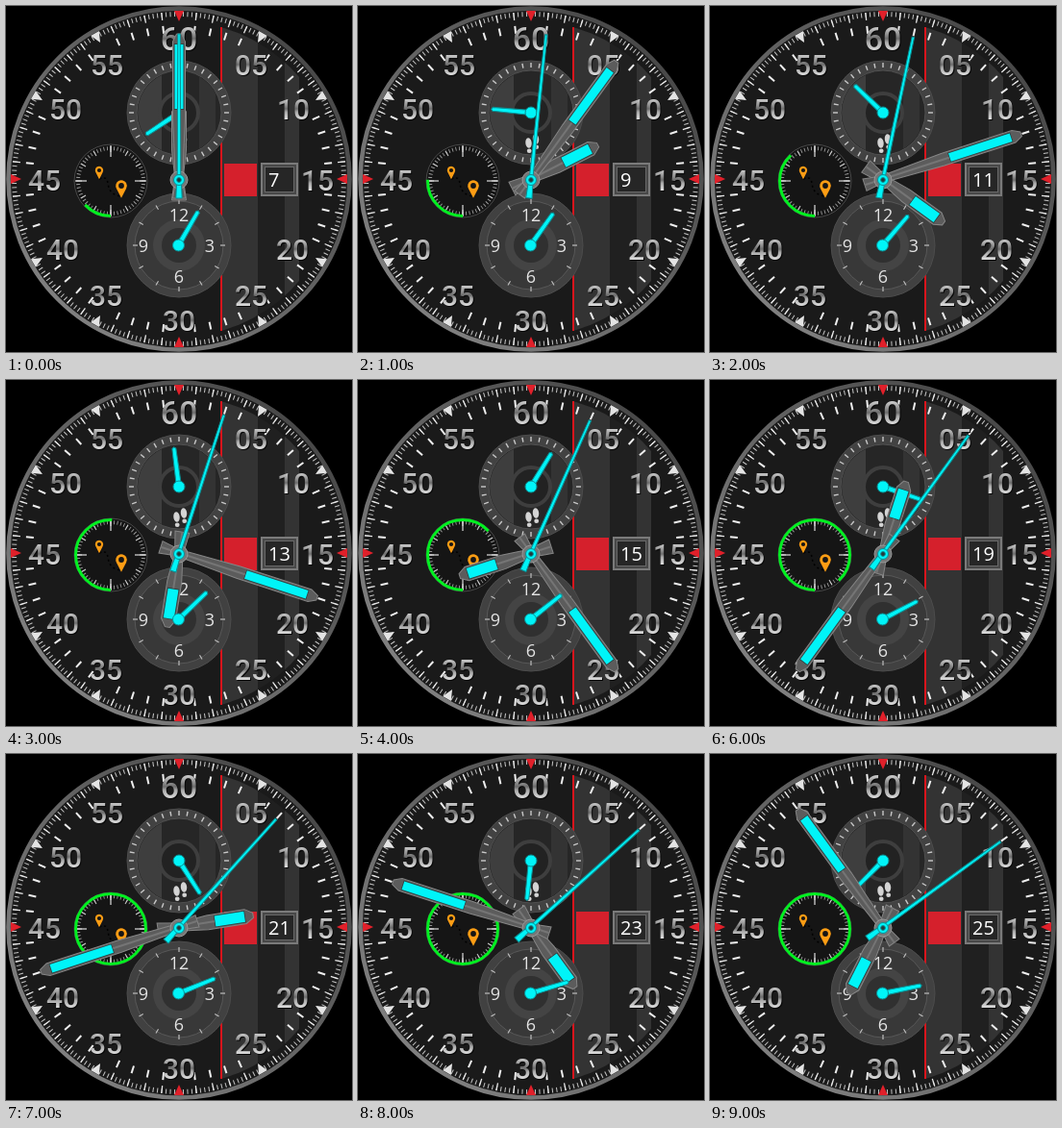
Recreate the animation shown at these times as an HTML page with a canvas. Size 360 by 360 pixels, loop 10000 ms.

```html
<!DOCTYPE html>
<html>
<head>
<meta charset="utf-8">
<style>
html, body { margin: 0; width: 100%; height: 100%; overflow: hidden; background: #000; }
canvas { display: block; }
</style>
</head>
<body>
<canvas id="stage" width="360" height="360"></canvas>
<script>
const CYAN = '#00f4f8', TEAL = '#0a8f94', RED = '#e0202a', GREEN = '#00f020', ORANGE = '#ff9d14';
const TAU = Math.PI * 2;
const rad = deg => deg * Math.PI / 180;
const stage = document.getElementById('stage').getContext('2d');
const faceCanvas = document.createElement('canvas');
faceCanvas.width = faceCanvas.height = 360;
let g = faceCanvas.getContext('2d');

function disc(x, y, r, fill, stroke, width = 1) {
  g.beginPath();
  g.arc(x, y, r, 0, TAU);
  if (fill) { g.fillStyle = fill; g.fill(); }
  if (stroke) { g.strokeStyle = stroke; g.lineWidth = width; g.stroke(); }
}

function rect(x, y, w, h, fill) {
  g.fillStyle = fill;
  g.fillRect(x, y, w, h);
}

function poly(points, fill, stroke) {
  g.beginPath();
  points.forEach(([x, y]) => g.lineTo(x, y));
  g.closePath();
  g.fillStyle = fill;
  g.fill();
  if (stroke) { g.strokeStyle = stroke; g.lineWidth = 1; g.stroke(); }
}

// Local space: origin at the pivot, up is the pointing direction.
function turned(x, y, deg, draw) {
  g.save();
  g.translate(x, y);
  g.rotate(rad(deg));
  draw();
  g.restore();
}

function clipped(x, y, r, draw) {
  g.save();
  g.beginPath();
  g.arc(x, y, r, 0, TAU);
  g.clip();
  draw();
  g.restore();
}

function ticks(x, y, count, inner, outer, width, color, skip = () => false) {
  for (let i = 0; i < count; i++) {
    if (skip(i)) continue;
    turned(x, y, i * 360 / count, () => rect(-width / 2, -outer, width, outer - inner, color));
  }
}

function text(str, x, y, font, fill, align = 'center') {
  g.font = font;
  g.textAlign = align;
  g.textBaseline = 'alphabetic';
  g.fillStyle = fill;
  g.fillText(str, x, y);
}

function numeral(str, x, y, size) {
  const cap = size * 0.711, top = y - cap / 2, base = y + cap / 2;
  const font = `500 ${size}px Roboto, Arial, sans-serif`;
  const metal = g.createLinearGradient(0, top, 0, base);
  metal.addColorStop(0, '#d0d0d0');
  metal.addColorStop(0.5, '#6c6c6c');
  metal.addColorStop(0.65, '#a8a8a8');
  metal.addColorStop(1, '#dcdcdc');
  text(str, x + 1, base + 1, font, '#080808');
  text(str, x, base, font, metal);
}

function drawScale() {
  ticks(180, 180, 240, 169, 174, 1, '#c4c4c4');
  ticks(180, 180, 60, 166, 174, 1.3, '#e8e8e8');
  ticks(180, 180, 60, 152, 160, 2, '#eee', i => i % 5 === 0);
  for (let i = 0; i < 12; i++) {
    turned(180, 180, i * 30, () =>
      poly([[-5, -175], [5, -175], [0, -164]], i % 3 ? '#e4e4e4' : RED));
  }
}

function drawNumerals() {
  const spots = [[180, 34], [255, 61], [299, 107], [324, 181], [298, 253], [255, 301],
    [180, 327], [104, 301], [59, 253], [40, 181], [62, 107], [105, 61]];
  spots.forEach(([x, y], i) => {
    const label = String(i * 5 || 60).padStart(2, '0');
    numeral(label, x, y, i ? 30 : 34);
  });
}

function foot(x, y) {
  g.fillStyle = '#d4d4d4';
  g.beginPath();
  g.ellipse(x, y, 3.2, 5.2, -0.12, 0, TAU);
  g.fill();
  g.beginPath();
  g.ellipse(x + 0.7, y + 8.2, 2.4, 2.3, 0, 0, TAU);
  g.fill();
}

function drawTopDial() {
  disc(180, 111, 54, '#424242', '#4c4c4c');
  disc(180, 111, 44, '#262626', '#505050');
  clipped(180, 111, 43, () => {
    rect(136, 66, 26, 90, '#3e3e3e');
    rect(201, 66, 17, 90, '#333');
  });
  disc(180, 111, 20, '#222', '#3e3e3e', 4);
  ticks(180, 111, 36, 47, 52, 1.4, '#c8c8c8');
  foot(177.5, 142.5);
  foot(185, 138.5);
}

function drawBottomDial() {
  disc(180, 249, 54, '#414141', '#4c4c4c');
  disc(180, 249, 46, '#383838', '#585858');
  disc(180, 249, 27, '#444');
  disc(180, 249, 18, '#303030');
  ticks(180, 249, 12, 43, 48, 1.2, '#bbb');
  const font = '18px "Open Sans", "Noto Sans", sans-serif';
  [['12', 180, 224], ['3', 212, 256], ['6', 180, 288], ['9', 143, 256]]
    .forEach(([str, x, y]) => text(str, x, y, font, '#e4e4e4'));
}

function pin(x, y, r) {
  g.beginPath();
  g.arc(x, y, r, rad(150), rad(30));
  g.lineTo(x, y + r * 2.2);
  g.closePath();
  g.fillStyle = ORANGE;
  g.fill();
  disc(x, y, r * 0.5, '#151515');
}

function drawLeftDial() {
  disc(109, 182, 38, '#151515', '#484848');
  ticks(109, 182, 60, 32, 36, 0.8, '#aaa');
  ticks(109, 182, 12, 30, 36, 1, '#ccc');
  ticks(109, 182, 4, 25, 37, 1.2, '#ddd');
  g.setLineDash([2, 3]);
  g.strokeStyle = '#000';
  g.lineWidth = 1.5;
  g.beginPath();
  g.moveTo(97, 180);
  g.bezierCurveTo(113, 174, 98, 194, 119, 198);
  g.stroke();
  g.setLineDash([]);
  pin(97, 171, 4.2);
  pin(120, 187, 5.8);
}

function drawWindow() {
  rect(227, 164, 34, 34, '#d5202c');
  rect(265, 163, 39, 35, '#7a7a7a');
  rect(267, 165, 35, 31, '#484848');
  rect(269, 167, 31, 27, '#686868');
  rect(270, 168, 29, 25, '#262626');
}

function drawFace() {
  rect(0, 0, 360, 360, '#000');
  const rim = g.createLinearGradient(50, 310, 310, 50);
  rim.addColorStop(0, '#808080');
  rim.addColorStop(1, '#484848');
  disc(180, 180, 177.5, '#1a1a1a', rim, 4.5);
  clipped(180, 180, 164, () => {
    rect(225, 0, 37, 360, '#333');
    rect(262, 0, 28, 360, '#202020');
    rect(290, 0, 15, 360, '#333');
  });
  drawScale();
  rect(223, 22, 2, 316, '#d8141c');
  drawNumerals();
  drawTopDial();
  drawBottomDial();
  drawLeftDial();
  drawWindow();
}

function smallHand(x, y, deg) {
  turned(x, y, deg, () =>
    poly([[-2.6, 0], [-2, -40], [0, -41.5], [2, -40], [2.6, 0]], CYAN, TEAL));
  disc(x, y, 6, CYAN, TEAL);
}

function mainHand(deg, length, tail, glowFrom, glowTo, half) {
  turned(180, 180, deg, () => {
    const tip = length - 8, waist = half - 2.5;
    poly([[-half, tail], [-waist, 4], [-waist, -8], [-half, -glowFrom + 8], [-half, -tip],
      [-2.5, -length], [2.5, -length], [half, -tip], [half, -glowFrom + 8],
      [waist, -8], [waist, 4], [half, tail]], '#5c5c5c', '#858585');
    rect(-1, -glowFrom, 2, glowFrom + tail, '#757575');
    const inset = half - 2;
    rect(-inset - 0.7, -glowTo - 0.7, inset * 2 + 1.4, glowTo - glowFrom + 1.4, '#2a3a3a');
    rect(-inset, -glowTo, inset * 2, glowTo - glowFrom, CYAN);
  });
}

function secondHand(deg) {
  turned(180, 180, deg, () =>
    poly([[-3.2, 20], [-2.6, 7], [-1.8, 0], [-1.2, -151], [1.2, -151],
      [1.8, 0], [2.6, 7], [3.2, 20]], CYAN, TEAL));
  disc(180, 181, 5.5, CYAN, TEAL);
  disc(180, 181, 2.4, '#26383a', TEAL);
}

function progress(sweep) {
  g.beginPath();
  g.arc(109, 182, 36.5, rad(90), rad(90 + Math.min(sweep, 360)));
  g.strokeStyle = GREEN;
  g.lineWidth = 3;
  g.stroke();
}

function draw(step) {
  g.drawImage(faceCanvas, 0, 0);
  text(String(7 + 2 * step), 273, 188, '20px "Open Sans", "Noto Sans", sans-serif', '#fff', 'left');
  progress(47 + 45 * step);
  smallHand(180, 111, 236.5 + 38.7 * step);
  mainHand(63 * step, 78, 22, 38, 69, 7.5);
  mainHand(36 * step, 151, 20, 73, 140, 6.5);
  disc(180, 181, 9, '#777', '#999');
  smallHand(179.5, 249, 30 + 5.4 * step);
  secondHand(6 * step);
}

drawFace();
g = stage;
const start = performance.now();
function tick() {
  const time = (performance.now() - start) % 10000;
  draw(Math.floor(time / 1000));
  requestAnimationFrame(tick);
}
tick();
</script>
</body>
</html>
```
